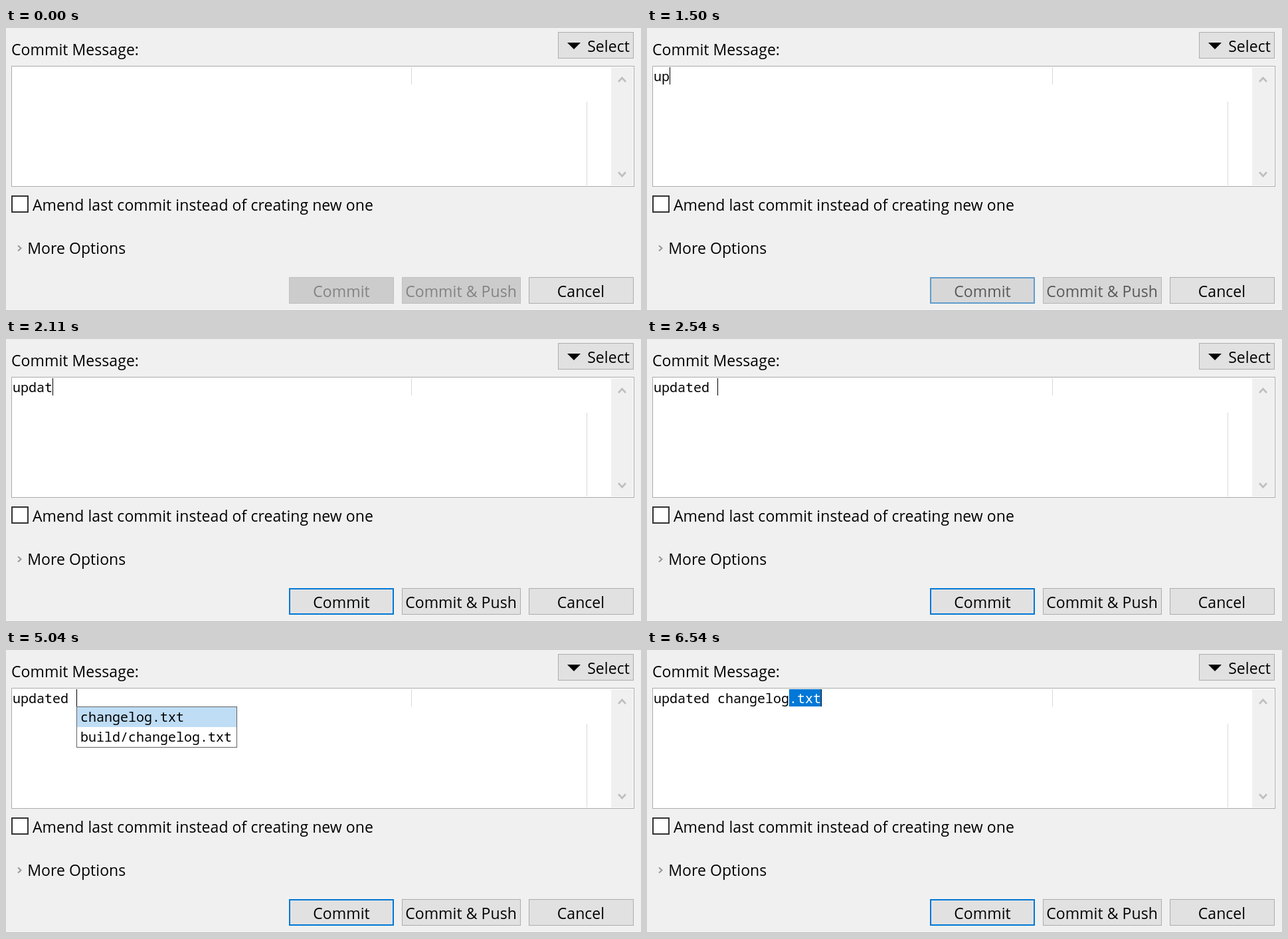
Recreate the animation shown at these times as an HTML page. Size 956 px wide and 426 px high, loop 8540 ms.

```html
<!DOCTYPE html>
<html lang="en">
<head>
<meta charset="utf-8">
<title>Commit message completion</title>
<style>
  html, body { margin: 0; width: 100%; height: 100%; overflow: hidden; background: #f0f0f0; }
  svg { display: block; width: 956px; height: 426px; }
  text { font: 23px "Open Sans", "Noto Sans", sans-serif; letter-spacing: .06px; white-space: pre; }
  .mid { text-anchor: middle; }
  .mono { font: 20px "Noto Sans Mono", "DejaVu Sans Mono", monospace; letter-spacing: 0; }
  .key { font-size: 39px; font-weight: 700; letter-spacing: 0; fill: #b400b4; }
  #enter { letter-spacing: -.9px; }
  rect { shape-rendering: crispEdges; }
  .arrow { fill: none; stroke: #bfbfbf; stroke-width: 2.6; }
</style>
</head>
<body>
<svg viewBox="0 0 956 426">
  <rect width="956" height="426" fill="#f0f0f0"/>
  <rect y="425" width="956" height="1" fill="#bcbcbc"/>

  <text x="8" y="41">Commit Message:</text>
  <rect x="831.5" y="6.5" width="113" height="39" fill="#e1e1e1" stroke="#adadad"/>
  <path d="M845 22h20l-10 10z"/>
  <text x="875.2" y="36">Select</text>

  <rect x="8.5" y="57.5" width="937" height="181" fill="#fff" stroke="#ababab"/>
  <rect x="911" y="59" width="33" height="178" fill="#f0f0f0"/>
  <path class="arrow" d="M922 81l5.500-6 5.500 6M922 217l5.500 6 5.500-6"/>
  <rect x="610" y="59" width="1" height="26" fill="#d8d8d8"/>
  <rect x="874" y="111" width="1" height="126" fill="#d8d8d8"/>

  <rect x="9" y="253" width="24" height="24" fill="#fff" stroke="#333" stroke-width="2"/>
  <text x="40" y="275">Amend last commit instead of creating new one</text>
  <path d="M18 327.500l4.500 4-4.500 4" fill="none" stroke="#979797" stroke-width="2"/>
  <text x="32.2" y="340">More Options</text>

  <rect id="commitEdge" x="426" y="375" width="158" height="40"/>
  <rect id="commitFace"/>
  <text id="commitText" class="mid" x="505" y="405">Commit</text>
  <rect id="pushFace" x="596.5" y="375.5" width="178" height="39"/>
  <text id="pushText" class="mid" x="685" y="405">Commit &amp; Push</text>
  <rect x="787.5" y="375.5" width="157" height="39" fill="#e1e1e1" stroke="#adadad"/>
  <text class="mid" x="865.5" y="405">Cancel</text>

  <rect id="mark" x="214" y="59" width="48" height="26" fill="#0078d7"/>
  <text id="typed" class="mono" x="10" y="80"></text>
  <text id="tail" class="mono" x="214" y="80" fill="#fff">.txt</text>
  <rect id="caret" y="59" width="1" height="26"/>

  <g id="popup">
    <rect x="106.5" y="85.5" width="241" height="61" fill="#fff" stroke="#646464"/>
    <rect x="107" y="86" width="240" height="30" fill="#bfddf5"/>
    <text class="mono" x="112" y="108">changelog.txt</text>
    <text class="mono" x="112" y="138">build/changelog.txt</text>
  </g>
  <text id="ctrlSpace" class="key" x="36.5" y="159">Ctrl+Space</text>
  <text id="enter" class="key" x="128.5" y="198">Enter</text>
</svg>
<script>
const LOOP = 8540, CHAR = 12, LEFT = 10;
const $ = id => document.getElementById(id);

// at: ms, text: typed so far, on: how far the buttons are enabled
const steps = [
  { at: 0, text: '', on: 0, noCaret: true },
  { at: 70, text: '', on: 0 },
  { at: 460, text: '', on: 0, noCaret: true },
  { at: 1010, text: '', on: 0 },
  { at: 1320, text: 'u', on: .2 },
  { at: 1500, text: 'up', on: .5 },
  { at: 1720, text: 'upd' },
  { at: 1950, text: 'upda' },
  { at: 2110, text: 'updat' },
  { at: 2190, text: 'update' },
  { at: 2310, text: 'updated' },
  { at: 2540, text: 'updated ' },
  { at: 3040, text: 'updated ', ctrlSpace: true },
  { at: 5040, text: 'updated ', popup: true },
  { at: 5540, text: 'updated ', popup: true, enter: true, noCaret: true },
  { at: 6540, text: 'updated changelog', tail: true }
];

const mix = (a, b, k) => `rgb(${a.map((v, i) => Math.round(v + (b[i] - v) * k))})`;
const gray = v => [v, v, v];
const show = (id, visible) => { $(id).style.display = visible ? '' : 'none'; };
const set = (id, attrs) => {
  for (const name in attrs) $(id).setAttribute(name, attrs[name]);
};

function drawButtons(on) {
  const face = mix(gray(204), gray(225), on);
  const ink = mix(gray(131), gray(0), on < 1 ? on * .66 : 1);
  const edge = on > 0 ? 2 : 1;
  set('commitEdge', { fill: mix(gray(191), [0, 120, 215], on) });
  set('commitFace', {
    x: 426 + edge, y: 375 + edge, width: 158 - 2 * edge, height: 40 - 2 * edge, fill: face
  });
  set('pushFace', { fill: face, stroke: mix(gray(191), gray(173), on) });
  set('commitText', { fill: ink });
  set('pushText', { fill: ink });
}

function draw(step) {
  const { text, on = 1, tail } = step;
  drawButtons(on);
  $('typed').textContent = text;
  set('caret', { x: LEFT + CHAR * (text.length + (tail ? 4 : 0)) });
  show('caret', !step.noCaret);
  show('mark', tail);
  show('tail', tail);
  for (const id of ['popup', 'ctrlSpace', 'enter']) show(id, step[id]);
}

const start = performance.now();
let current;
function tick() {
  const t = (performance.now() - start) % LOOP;
  const step = steps.filter(s => s.at <= t).pop();
  if (step !== current) draw(current = step);
  requestAnimationFrame(tick);
}
tick();
</script>
</body>
</html>
```
